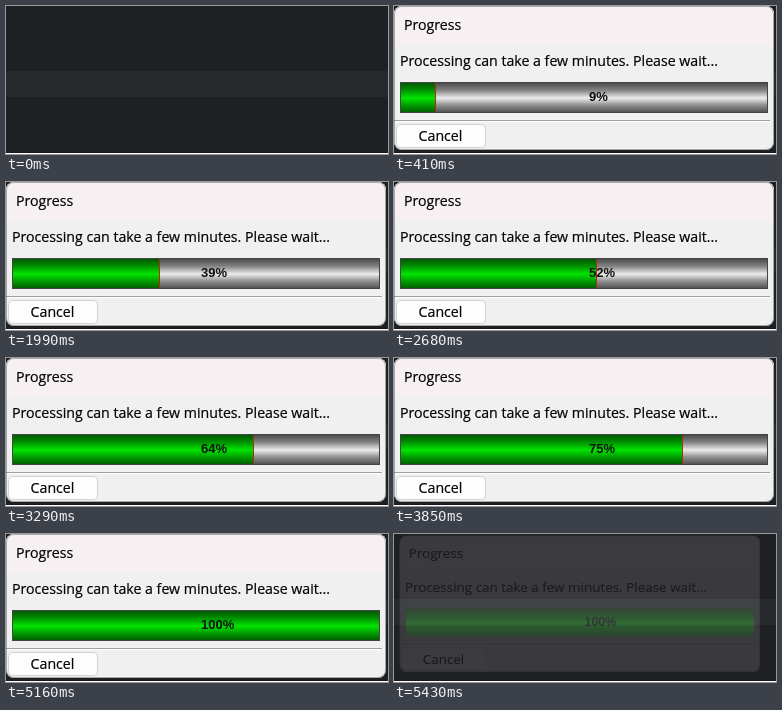
An HTML page that plays this animation: 382x148 px, repeating every 5.5 s.

```html
<!DOCTYPE html>
<html lang="en">
<head>
<meta charset="utf-8">
<title>Progress</title>
<style>
html, body { margin: 0; width: 100%; height: 100%; overflow: hidden; background: #1f2024; }
svg { display: block; }
text { font: 14.16px "Open Sans", "Noto Sans", sans-serif; fill: #000; stroke: #000; stroke-width: .2; }
#label { font: bold 13px "Liberation Sans", Arial, sans-serif; fill: #111; stroke: none; }
</style>
</head>
<body>
<svg width="382" height="148" viewBox="0 0 382 148">
  <defs>
    <linearGradient id="steel" x2="0" y2="1">
      <stop stop-color="#4a4a4a"/>
      <stop offset=".25" stop-color="#868686"/>
      <stop offset=".5" stop-color="#ececec"/>
      <stop offset=".75" stop-color="#8c8c8c"/>
      <stop offset="1" stop-color="#4c4c4c"/>
    </linearGradient>
    <linearGradient id="green" x2="0" y2="1">
      <stop stop-color="#005800"/>
      <stop offset=".25" stop-color="#009400"/>
      <stop offset=".5" stop-color="#00e400"/>
      <stop offset=".75" stop-color="#009a00"/>
      <stop offset="1" stop-color="#005800"/>
    </linearGradient>
    <clipPath id="frame"><rect width="380" height="144" rx="8"/></clipPath>
  </defs>

  <rect width="382" height="148" fill="#1f2024"/>
  <rect y="65" width="382" height="26" fill="#28292d"/>
  <rect y="146" width="382" height="1" fill="#1c161f"/>
  <rect y="147" width="382" height="1" fill="#fff"/>

  <g id="dialog">
    <g id="panel" clip-path="url(#frame)">
      <rect width="380" height="144" fill="#f0f0f0"/>
      <rect width="380" height="38" fill="#f6f0f2"/>
      <text x="10" y="24">Progress</text>
      <text x="6" y="60">Processing can take a few minutes. Please wait...</text>
      <rect y="114" width="376" height="1" fill="#a0a0a0"/>
      <rect y="115" width="376" height="1" fill="#fff"/>
      <rect x="2.5" y="118.5" width="89" height="23" rx="4" fill="#fdfdfd" stroke="#d2d2d2"/>
      <text x="46.5" y="135" text-anchor="middle">Cancel</text>
      <rect x=".5" y=".5" width="379" height="143" rx="7.5" fill="none" stroke="#000" stroke-opacity=".3"/>
    </g>
    <g id="bar">
      <rect x="7" y="77" width="366" height="30" fill="url(#steel)"/>
      <rect id="fill" x="7" y="77" height="30" fill="url(#green)"/>
      <rect id="edge" y="77" width="1" height="30" fill="#b82810"/>
      <rect x="6.5" y="76.5" width="367" height="30" fill="none" stroke="#444"/>
      <text id="label" x="195" y="95"></text>
    </g>
  </g>
</svg>
<script>
const LOOP = 5500, BAR_LEFT = 7, BAR_WIDTH = 366;
const $ = id => document.getElementById(id);
const set = (id, name, value) => $(id).setAttribute(name, value);

// 0 = hidden, 1 = fully open; the window opens and closes in hard steps
function openness(t) {
  if (t < 60) return 0;
  if (t < 270) return 1 - (1 - Math.floor((t - 60) / 70 + 1) / 4) ** 2;
  return 1;
}

function closing(t) {
  return [5300, 5360, 5430].filter(start => t >= start).length / 3;
}

function draw(t) {
  const open = openness(t), close = closing(t);
  const scale = 1 - 0.05 * (close + 1 - open);
  const alpha = open * (1 - 0.87 * close);
  const percent = Math.min(100, Math.floor(1.3 + t * 0.01917));
  const width = Math.min(BAR_WIDTH, Math.round(percent * 3.75));

  set("dialog", "transform", `translate(106 28) scale(${scale}) translate(-106 -28)`);
  set("panel", "opacity", alpha);
  set("bar", "opacity", close ? alpha ** 0.68 : alpha); // the bar fades more slowly
  set("fill", "width", width);
  set("edge", "x", BAR_LEFT + width);
  set("edge", "opacity", width < BAR_WIDTH ? 1 : 0);
  $("label").textContent = percent + "%";
}

const start = performance.now();
function tick() {
  draw((performance.now() - start) % LOOP);
  requestAnimationFrame(tick);
}
tick();
</script>
</body>
</html>
```
